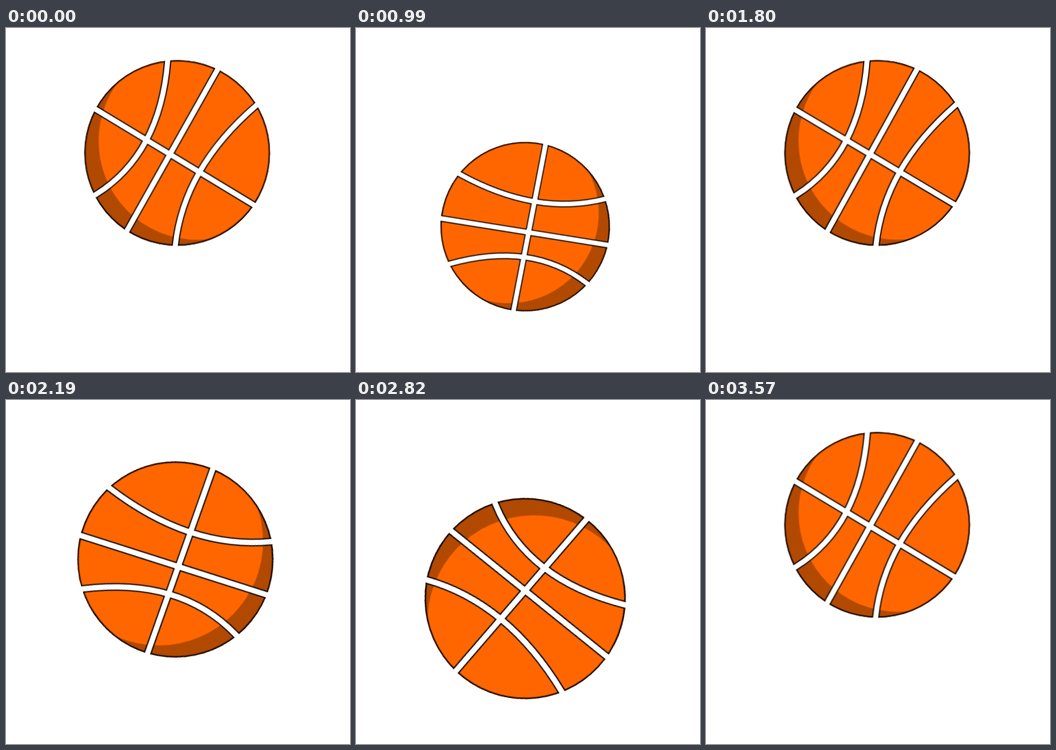
These frames come from a looping animation (500 by 500 pixels, 3630 ms). An HTML page:

```html
<!DOCTYPE html>
<html lang="en">
<head>
<meta charset="utf-8">
<title>Bouncing basketball</title>
<style>
  html, body { margin: 0; width: 100%; height: 100%; overflow: hidden; background: #fff; }
  svg { display: block; width: 100vw; height: 100vh; }

  /* 0.9 s per fall or rise, then a short rest before the loop restarts */
  .bounce, .spin, .zoom { transform-origin: 0 0; animation: 3.63s infinite; }
  .bounce { animation-name: bounce; animation-timing-function: linear; }
  .spin { animation-name: spin; animation-timing-function: cubic-bezier(.167, .167, .667, 1); }
  .zoom { animation-name: zoom; animation-timing-function: cubic-bezier(.167, .167, .667, 1); }

  @keyframes bounce {
    0%, 49.587%, 98.347%, 100% { transform: translate(246.5px, 181.3px); }
    24.793%, 74.38% { transform: translate(246.5px, 303.1px); }
  }
  @keyframes spin {
    0%, 98.347%, 100% { transform: rotate(0deg); }
    49.587% { transform: rotate(360deg); }
  }
  @keyframes zoom {
    0%, 49.587%, 98.347%, 100% { transform: scale(1); }
    24.793% { transform: scale(.9); }
    74.38% { transform: scale(1.1); }
  }

  .seams { fill: none; }
  .soft { stroke: #000; stroke-opacity: .35; stroke-width: 11.6; }
  .edge { stroke: #000; stroke-width: 10; }
  .gap { stroke: #fff; stroke-width: 7.4; }
</style>
</head>
<body>
<svg viewBox="0 0 500 500">
  <defs>
    <clipPath id="disc"><circle cx="248.8" cy="181.5" r="135"/></clipPath>
    <g id="lines">
      <path d="M122.4 113.8 L369.6 262.2"/>
      <path d="M310.4 54.2 L172.4 301.7"/>
      <path d="M235 40 L234.5 48 Q223.8 183.5 131.3 242 L124.5 246.3"/>
      <path d="M369.6 106.8 L363.5 112 Q258.2 203.5 246.6 316 L245.8 324"/>
    </g>
  </defs>
  <g class="bounce"><g class="spin"><g class="zoom">
    <g transform="translate(-246.5 -181.3)">
      <g clip-path="url(#disc)">
        <circle cx="248.8" cy="181.5" r="136" fill="#b24900"/>
        <circle cx="278.2" cy="164" r="143.7" fill="#f60"/>
        <use href="#lines" class="seams soft"/>
        <circle cx="248.8" cy="181.5" r="133.8" fill="none" stroke="#000" stroke-opacity=".35" stroke-width="2.6"/>
        <circle cx="248.8" cy="181.5" r="134.3" fill="none" stroke="#000" stroke-width="1.6"/>
        <use href="#lines" class="seams edge"/>
      </g>
      <use href="#lines" class="seams gap"/>
    </g>
  </g></g></g>
</svg>
</body>
</html>
```
